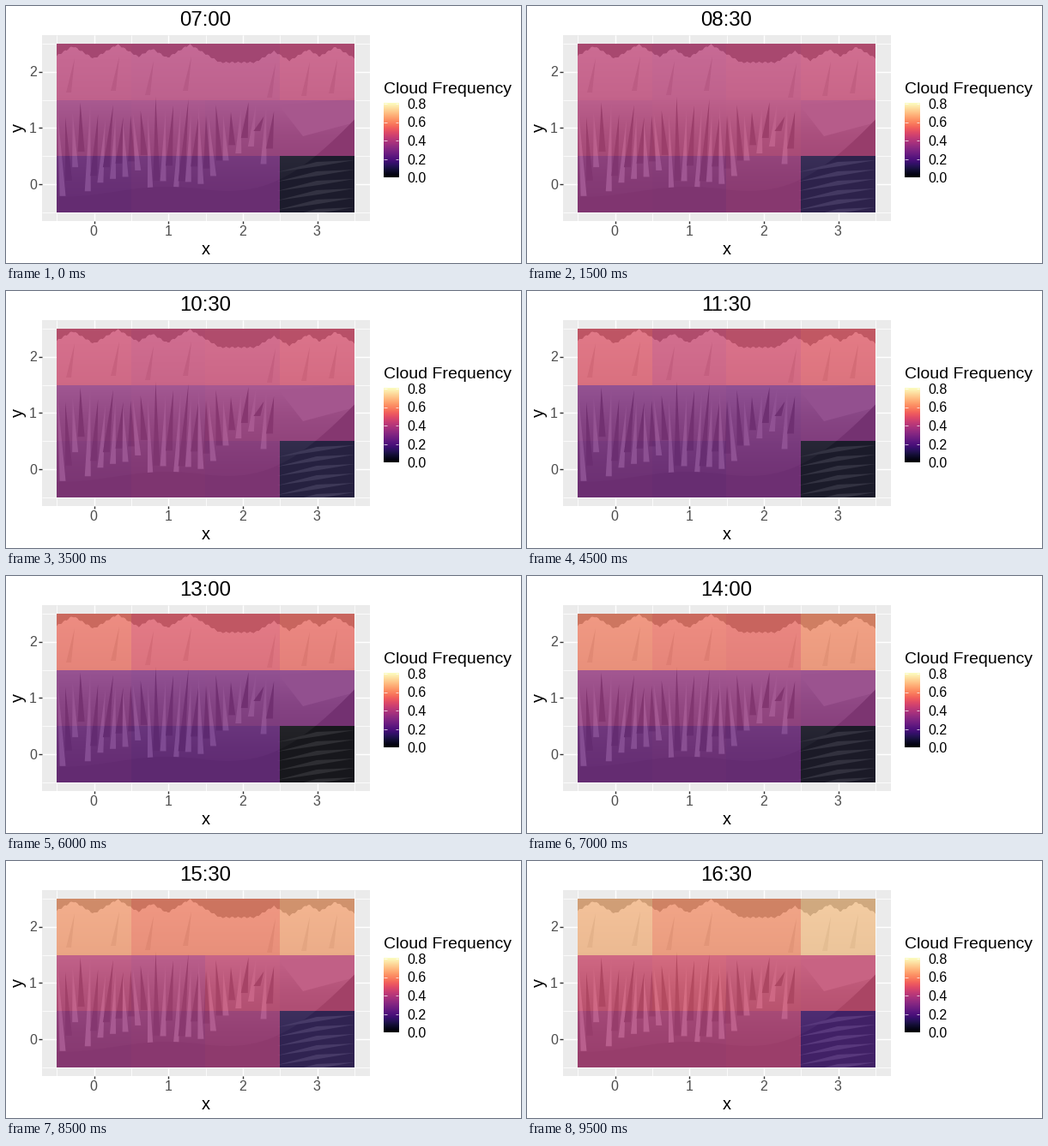
Animation of 600 by 300 pixels, one loop 10000 ms. Source, as a matplotlib script:

```python
import numpy as np
import matplotlib.pyplot as plt
from matplotlib.animation import FuncAnimation
from matplotlib.patches import Polygon, Rectangle

W, H, DPI = 600, 300, 100
FRAMES, INTERVAL = 20, 500
X0, Y0, DX, DY = 102.6, 208.0, 86.75, 65.6   # pixel origin and size of a data unit
LEFT, RIGHT, TOP, BOTTOM = 59, 406, 44, 241
PX, PY, PW, PH = 42, 34.2, 382, 216.4        # grey panel
MAGMA = plt.get_cmap("magma")
rng = np.random.default_rng(4)

plt.rcParams["font.family"] = "Liberation Sans"
fig = plt.figure(figsize=(W / DPI, H / DPI), dpi=DPI, facecolor="white")
ax = fig.add_axes([0, 0, 1, 1])
ax.axis("off")


def label(x, y, text, px, color="black", ha="center", **kw):
    return ax.text(x, y, text, fontsize=px * 72 / DPI, color=color, ha=ha,
                   va="baseline", **kw)


def line(xs, ys, color, px, z=1):
    ax.plot(xs, ys, color=color, lw=px * 72 / DPI, zorder=z,
            solid_capstyle="butt")


def rect(x, y, w, h, color, z, **kw):
    return ax.add_patch(Rectangle((x, y), w, h, fc=color, ec="none", lw=0,
                                  zorder=z, **kw))


def gradient(values, cmap, box, z):
    return ax.imshow(np.asarray(values)[:, None], cmap=cmap, vmin=0, vmax=1,
                     aspect="auto", extent=box, zorder=z)


def shape(points, grey, z=4):
    patch = ax.add_patch(Polygon(points, fc=str(grey), ec="none", lw=0, zorder=z))
    patch.set_clip_path(photo)
    return patch


def sliver(x, y, foot, base, half, grey):
    shape([(x, y), (foot + half, base), (foot - half, base)], grey)


def slope(xs, ys, grey, z):
    """Fill everything below a contour, down to the foot of the photo."""
    return shape([*zip(xs, ys), (RIGHT, BOTTOM), (LEFT, BOTTOM)], grey, z)


# Panel, grid and axes
rect(PX, PY, PW, PH, "#EBEBEB", 0)
for major, width in ((False, 0.75), (True, 1.45)):
    shift = 0 if major else -0.5
    for i in range(4 if major else 5):
        x = X0 + (i + shift) * DX
        line([x, x], [PY, PY + PH], "white", width)
    for i in range(3 if major else 4):
        y = Y0 - (i + shift) * DY
        line([PX, PX + PW], [y, y], "white", width)
for i in range(4):
    x = X0 + i * DX
    line([x, x], [PY + PH, PY + PH + 3.7], "#333333", 1.4)
    label(x - 0.5, 268, str(i), 16, "#4D4D4D")
for i in range(3):
    y = Y0 - i * DY
    line([PX - 3.7, PX], [y, y], "#333333", 1.4)
    label(36, y + 5.7, str(i), 16, "#4D4D4D", "right")
label(232.7, 290, "x", 20)
label(20.3, 142, "y", 20, rotation=90, rotation_mode="anchor")
title = label(232.3, 23, "", 24)

# Mountain backdrop: sky, a ridge fading from snow to rock, gullies
photo = rect(LEFT, TOP, RIGHT - LEFT, BOTTOM - TOP, "0.40", 2)
xs = np.linspace(LEFT, RIGHT, 175)
peaks = [(78, 47), (130, 45), (170, 50), (214, 45), (312, 53), (352, 51), (384, 48)]
ridge = np.min([top + 0.6 * abs(xs - px) for px, top in peaks], axis=0)
ridge = np.minimum(ridge, 66) + np.sin(xs * 0.9)
mountain = slope(xs, ridge, 0.8, 2)
depth = np.linspace(TOP, BOTTOM, 200)
fade = np.interp(depth, [44, 105, 150, 200, 241], [0.86, 0.76, 0.54, 0.38, 0.30])
gradient(fade, "gray", (LEFT, RIGHT, BOTTOM, TOP), 3).set_clip_path(mountain)

for px, top in peaks:
    sliver(px + 2, top + 14, px - 5, top + 54, 3, 0.66)
for foot in np.linspace(66, 300, 17):
    base = rng.uniform(185, 224) - max(0, foot - 230) * 0.5
    lean = 6 * np.sin(foot / 14)
    sliver(foot + lean, rng.uniform(108, 135), foot, base, 3.5, 0.74)
    sliver(foot + lean + 9, rng.uniform(102, 130), foot + 7, base - 18, 4, 0.30)
shape([(318, 116), (RIGHT, 108), (RIGHT, 136), (346, 152)], 0.70)
slope(xs, 217 + 6 * np.sin(xs / 40) - 0.0026 * np.clip(xs - 230, 0, None) ** 2,
      0.30, 5)
for y in range(184, 240, 11):
    shape([(316, y + 10), (362, y - 2), (RIGHT, y - 4), (364, y + 3)], 0.6, 6)

# Relative cloud cover for each tile and step
t = np.linspace(0, 1, FRAMES)


def daily_wave(lag):
    return 0.42 + 0.085 * np.cos(2 * np.pi * (t - 0.16 - lag) / 0.84) + 0.08 * t**2


def tile_cover(row, col):
    if row == 0:
        base = 0.53 + 0.25 * t**2 + 0.08 * t * (col in (0, 3))
    else:
        base = daily_wave(0.06 * (row - 1)) - 0.07 * (row - 1)
    if (row, col) == (2, 3):
        return np.clip(0.9 * (base - 0.28), 0, 1)
    return base + rng.normal(0, 0.012, FRAMES)


tiles = []
edges_x = np.round(np.linspace(LEFT, RIGHT, 5))
edges_y = np.round(np.linspace(TOP, BOTTOM, 4))
for row in range(3):
    for col in range(4):
        x, y = edges_x[col], edges_y[row]
        patch = rect(x, y, edges_x[col + 1] - x, edges_y[row + 1] - y, "black", 8,
                     alpha=0.7, antialiased=False)
        tiles.append((patch, tile_cover(row, col)))

# Legend
label(440, 102, "Cloud Frequency", 19.5, ha="left")
BAR_L, BAR_R, BAR_T, BAR_B = 440, 457.3, 114, 200.5
gradient(np.linspace(1, 0, 256), MAGMA, (BAR_L, BAR_R, BAR_B, BAR_T), 2)
for i in range(5):
    y = BAR_B - i * (BAR_B - BAR_T) / 4
    label(467, y + 5.7, f"{i * 0.2:.1f}", 16, ha="left")
    line([BAR_L, BAR_L + 3.5], [y, y], "white", 0.7, 3)
    line([BAR_R - 3.5, BAR_R], [y, y], "white", 0.7, 3)

ax.set_xlim(0, W)
ax.set_ylim(H, 0)


def update(step):
    minutes = 7 * 60 + 30 * step
    title.set_text(f"{minutes // 60:02d}:{minutes % 60:02d}")
    for patch, cover in tiles:
        patch.set_facecolor(MAGMA(cover[step]))
    return [title, *(patch for patch, _ in tiles)]


anim = FuncAnimation(fig, update, frames=FRAMES, interval=INTERVAL,
                     repeat=True, repeat_delay=0)
plt.show()
```
